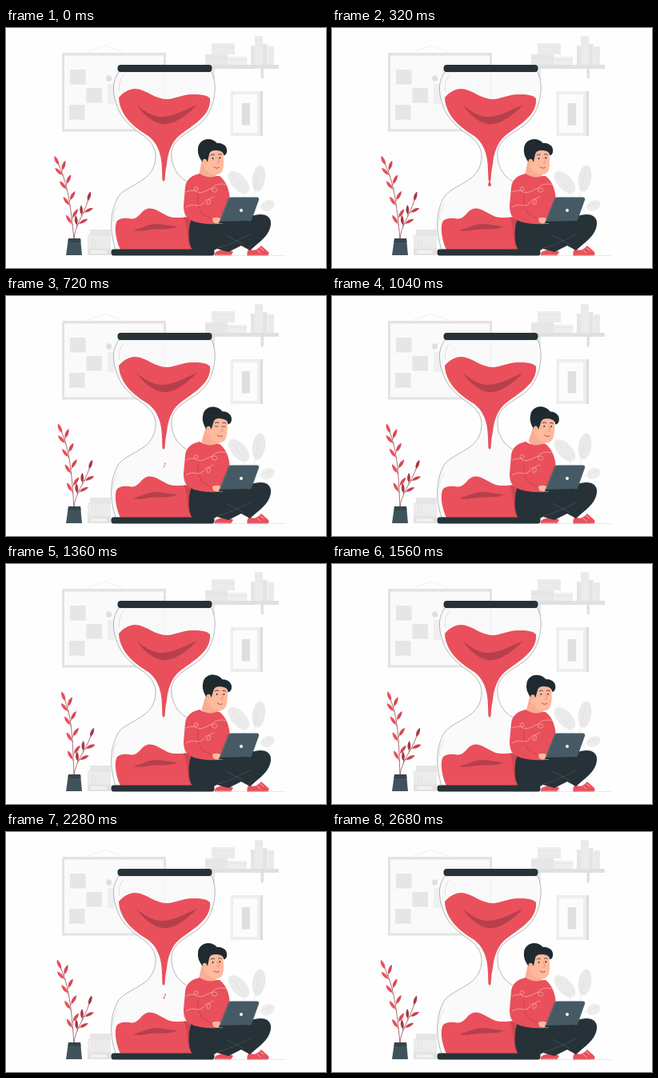
An HTML page with a canvas that plays this animation: 400 px wide and 300 px high, repeating every 2880 ms.

```html
<!DOCTYPE html>
<html lang="en">
<head>
<meta charset="utf-8">
<title>Waiting by the hourglass</title>
<style>
html, body { margin: 0; width: 100%; height: 100%; overflow: hidden; background: #fff; }
canvas { display: block; width: 400px; height: 300px; }
</style>
</head>
<body>
<canvas id="stage"></canvas>
<script>
const LOOP = 2880, STEP = 40, LAST = 2680;
const RED = '#e9505b', DEEP = '#b5404b', INK = '#263238', SKIN = '#ffb99d', HAIR = '#1f2a30';
const canvas = document.getElementById('stage');
const ctx = canvas.getContext('2d');
const ratio = window.devicePixelRatio || 1;
canvas.width = 400 * ratio;
canvas.height = 300 * ratio;

function fill(d, color) {
  ctx.fillStyle = color;
  ctx.fill(new Path2D(d));
}

function line(d, color, width = 0.8) {
  ctx.strokeStyle = color;
  ctx.lineWidth = width;
  ctx.stroke(new Path2D(d));
}

function rect(x, y, w, h, color) {
  ctx.fillStyle = color;
  ctx.fillRect(x, y, w, h);
}

function oval(x, y, rx, ry, color, angle = 0) {
  ctx.fillStyle = color;
  ctx.beginPath();
  ctx.ellipse(x, y, rx, ry, angle, 0, Math.PI * 2);
  ctx.fill();
}

// Smooth 0..1 ramp between two times.
function ease(t, from, to) {
  const p = Math.min(1, Math.max(0, (t - from) / (to - from)));
  return p * p * (3 - 2 * p);
}

function drawRoom() {
  line('M99 31L124 22L148 31', '#e6e6e6', 0.6);
  rect(70, 31, 130, 98.5, '#e3e3e3');
  rect(73, 34.5, 124, 92, '#fafafa');
  for (const [x, y] of [[80, 52], [100.5, 75], [79, 96]]) {
    rect(x, y, 19.5, 18, '#e6e6e6');
    line(`M${x} ${y + 18}h19.5`, '#dadada', 0.6);
  }
  oval(128.6, 63, 3.5, 3.8, '#dedede');
  rect(127, 70, 9, 25, '#efefef');

  rect(258, 51, 3, 13, '#e8e8e8');
  rect(318.5, 51, 3.5, 12, '#e0e0e0');
  rect(249, 46, 92, 5, '#e0e0e0');
  rect(257, 19, 29, 14, '#ebebeb');
  rect(249, 33, 28, 13, '#e7e7e7');
  rect(277, 36, 24, 10, '#eeeeee');
  line('M257 23.5h29M249 37h28M277 39.5h24', '#e0e0e0', 0.6);
  rect(306, 22, 5, 24, '#e5e5e5');
  rect(311, 10, 10, 36, '#ebebeb');
  rect(321, 20, 5, 26, '#e4e4e4');
  rect(327, 23, 8, 23, '#eaeaea');
  line('M311 15h10M327 27h8M326 20v26', '#dcdcdc', 0.6);

  rect(280.5, 79, 40.5, 56, '#eeeeee');
  rect(318, 79, 3, 56, '#dcdcdc');
  rect(284, 83, 30, 48, '#fcfcfc');
  rect(294.7, 94, 10.3, 27.5, '#dfdfdf');

  oval(291, 193, 9, 17, '#ebebeb', -0.75);
  oval(316, 188, 8, 16.5, '#e9e9e9', 0.15);
  oval(327, 222, 9, 6.5, '#ededed', -0.4);
  line('M302 228Q300 203 282 183M309 228Q309 204 317 177M310 230Q316 222 332 219', '#dddddd', 0.6);

  rect(105, 252, 26, 7, '#e6e6e6');
  rect(102, 259, 29, 17, '#ececec');
  rect(102, 276, 29, 8, '#e2e2e2');
  rect(106, 278, 20, 4, '#f0f0f0');
  line('M102 259h29M102 275h29M108 263v9M112 263v9', '#dedede', 0.7);
  line('M225 284.5H349', '#d2d2d2', 0.5);
}

function drawGlass() {
  const glass = 'M141 55C133 66 133 78 137 92C142 111 153 121 168 132C182 141 187 151 187 160' +
    'C187 172 182 182 172 189C159 198 147 202 141 210C131 226 128 250 137 277H252' +
    'C262 252 258 224 247 207C240 198 226 194 217 185C210 177 207 168 207 160' +
    'C206 149 211 143 219 136C234 125 245 121 253 107C262 90 264 69 257 55Z';
  fill(glass, 'rgba(250,250,250,.85)');
  line(glass, '#8d9294', 0.65);
  line('M147 59C142 65 140 73 142 79', '#c2c5c6', 0.5);
  line('M140 221C135 229 134 234 134 241', '#c2c5c6', 0.5);

  fill('M141 87C145 82 152 76 162 76C176 77 186 89 201 89C211 89 220 83 232 83C242 83 250 83 255 88' +
    'C256 98 251 107 243 114C235 122 224 128 216 135C206 144 202 158 201 170' +
    'C199 179 199 185 198.500 190Q197 193 195.500 190C195 178 195 170 193.500 162' +
    'C191 149 185 139 174 132.500C162 125 153 117 147 107C143 100 141 93 141 87Z', RED);
  fill('M163 96C172 103 182 111 196 111C212 110 226 101 239 96C227 108 212 120 198 120.500' +
    'C183 119 172 108 163 96Z', DEEP);

  fill('M143 277C138 267 135 251 138 243C140 237 150 237 157 238.500C167 239 169 226 179 225.500' +
    'C190 225 199 237 211 237C221 237 230 235 246 242L250 278Z', RED);
  fill('M159 253C170 250 178 245 188 245C198 245 205 248 215 248C205 253 196 251 187 251.500' +
    'C177 252 168 255 159 253Z', DEEP);
  fill('M222 236.500H240V277H232C224 266 229 249 222 236.500Z', '#cc4752');

  ctx.fillStyle = INK;
  ctx.beginPath();
  ctx.roundRect(139.5, 46, 118, 9, 4);
  ctx.roundRect(131.5, 276.5, 129, 8, 3);
  ctx.fill();
}

function drawDrop(t) {
  for (const start of [160, 1800]) {
    const age = t - start;
    if (age < 0 || age > 700) continue;
    if (age < 280) {
      const y = 190 + 5.5 * ease(age, 0, 160);
      rect(196.2, 187, 1.6, y - 187, RED);
      oval(197, y, 2, 2.6, RED);
    } else {
      const fall = (age - 280) / 420;
      const y = 197 + 25 * fall * fall + 2 * fall;
      const size = 1 - 0.6 * fall;
      oval(199, y, 0.9 * size, 2.6 * size, RED);
      oval(197.6, y + 3.5, 0.9 * size, 2.6 * size, RED);
    }
  }
}

function drawPlant(t) {
  const sway = -4.5 * Math.cos(Math.PI * 2 * t / LOOP);
  const bend = ([x, y]) => [x + sway * Math.pow(Math.max(0, 263 - y) / 100, 1.3), y];

  function leaf(x, y, angle, size, color) {
    ctx.save();
    ctx.translate(x, y);
    ctx.rotate(angle);
    fill(`M0 0C${size * .25} ${-size * .24} ${size * .7} ${-size * .22} ${size} 0` +
      `C${size * .7} ${size * .18} ${size * .25} ${size * .2} 0 0Z`, color);
    ctx.restore();
  }

  function branch(points, spots, size, colors) {
    const [a, b, c, d] = points.map(bend);
    line(`M${a}C${b} ${c} ${d}`, '#8d343e', 0.7);
    const at = (s, i) => (1 - s) ** 3 * a[i] + 3 * s * (1 - s) ** 2 * b[i] +
      3 * s * s * (1 - s) * c[i] + s ** 3 * d[i];
    spots.forEach((s, i) => {
      const x = at(s, 0), y = at(s, 1);
      const heading = Math.atan2(y - at(s - .02, 1), x - at(s - .02, 0));
      const side = s === 1 ? 0 : (i % 2 ? 0.68 : -0.48);
      const stalk = s === 1 ? 0 : 2;
      const angle = heading + side;
      const px = x + Math.cos(angle) * stalk, py = y + Math.sin(angle) * stalk;
      line(`M${x} ${y}L${px} ${py}`, '#8d343e', 0.6);
      leaf(px, py, angle, size, colors[i % 2]);
    });
  }

  branch([[85, 264], [83, 240], [82, 198], [70, 171]], [.22, .3, .46, .52, .66, .72, .84, .9, 1], 12.5, [RED, '#d74855']);
  branch([[85, 264], [86, 248], [98, 234], [104, 216]], [.34, .4, .62, .7, 1], 12, ['#a83843', '#c9444f']);
  fill('M78 263H93L95 284H75Z', '#40535d');
  fill('M78 263H93L93.500 268H77.500Z', '#35444c');
}

function drawHead(t) {
  const turn = ease(t, 300, 920) - ease(t, 1100, 1920);
  const blink = (t >= 640 && t < 800) || (t >= 1640 && t < 1760);
  ctx.save();
  ctx.translate(252 + 4 * turn, 188 - turn);
  ctx.rotate(0.11 * turn);
  ctx.translate(-252, -188);
  fill('M246 160L241 184L255 194L263 183V172Z', '#f9ad93');
  fill('M247 153L270 151C272 160 273 169 271 177C269 184 260 185 254 181L247 174Z', SKIN);
  fill('M246 168C243 164 239 158 240 151C240 144 246 139 252 139C258 139 261 141 264 144' +
    'C269 143 276 147 276 152C277 156 274 160 272 159C272 155 268 153 262 153' +
    'C258 153 255 154 254 158L252 167Z', HAIR);
  oval(248.5, 167.5, 2.8, 3.8, SKIN, -.2);
  line('M247 166.500q2 0 2 2.500', '#d98b78', .5);
  line('M256 159q2.500 -2 4.500 -.5M265.500 158q2.500 -1.500 4 .5', HAIR, .8);
  if (blink) {
    line('M256.500 163q2 1 3.500 0M265.500 162.500q2 1 3.500 0', HAIR, .7);
  } else {
    oval(258.5, 163, .8, 1.2, HAIR);
    oval(267.3, 162.3, .8, 1.2, HAIR);
  }
  line('M264 162q3 5 2 6.500h-2', '#d98070', .7);
  line('M260 174q3 2.500 6.500 .5', '#8d4240', .75);
  ctx.restore();
}

function drawMan(t) {
  fill('M304 276Q311 281 319 272L328 280Q330 284.500 325 285H302Q300 280 304 276Z', RED);
  fill('M264 279L276 275L284 280L281 284.500H261Q260 281 264 279Z', RED);
  line('M303 284.300h24M262 284h18M314 278l4 3M318 275l4 3', '#ffd7d5', .7);
  fill('M234 236C227 244 227 270 233 277C243 283 257 280 264 276L278 280L294 272L305 278L313 271' +
    'C325 262 332 252 331 242C329 232 318 231 304 236L268 245C256 234 244 232 234 236Z', INK);
  line('M262 276Q283 270 305 258M275 259L296 270', '#4a5960', .65);

  drawHead(t);
  fill('M242 182C233 184 225 189 224 199L222 222C222 230 224 236 229 239Q240 246 265 245' +
    'L280 214C279 203 276 192 267 185L263 185Q253 189 242 182Z', RED);
  line('M240 208Q238 221 245 232L256 238', DEEP, .7);
  line('M225 205C232 201 240 206 240 200C236 196 232 202 239 205C247 208 253 200 260 200' +
    'C267 200 263 208 258 204C255 197 267 193 276 196', '#ffd0d0', .55);
  line('M225 224C234 217 240 226 247 219C251 212 257 213 255 219C250 225 248 214 260 211', '#ffd0d0', .55);
  fill('M258 238Q264 235 270 239L273 243Q266 246 259 243Z', SKIN);

  fill('M278 213Q279 211.500 282 211.500H314Q317 212 316 215L307 240Q306 242 302 242L267 244L267 241Z', '#455a64');
  line('M279 213L268 241', '#5b6e77', 1);
  fill('M266 242L304 241L303 243L267 244.500Z', INK);
  oval(294, 228, 2, 2, '#f7f7f7');
}

const start = performance.now();

function draw(now) {
  const elapsed = Math.max(0, now - start) % LOOP;
  const t = Math.min(LAST, Math.floor(elapsed / STEP) * STEP);
  ctx.setTransform(ratio, 0, 0, ratio, 0, 0);
  ctx.lineCap = ctx.lineJoin = 'round';
  rect(0, 0, 400, 300, '#fefefe');
  drawRoom();
  drawGlass();
  drawDrop(t);
  drawPlant(t);
  drawMan(t);
  requestAnimationFrame(draw);
}
draw(start);
</script>
</body>
</html>
```
